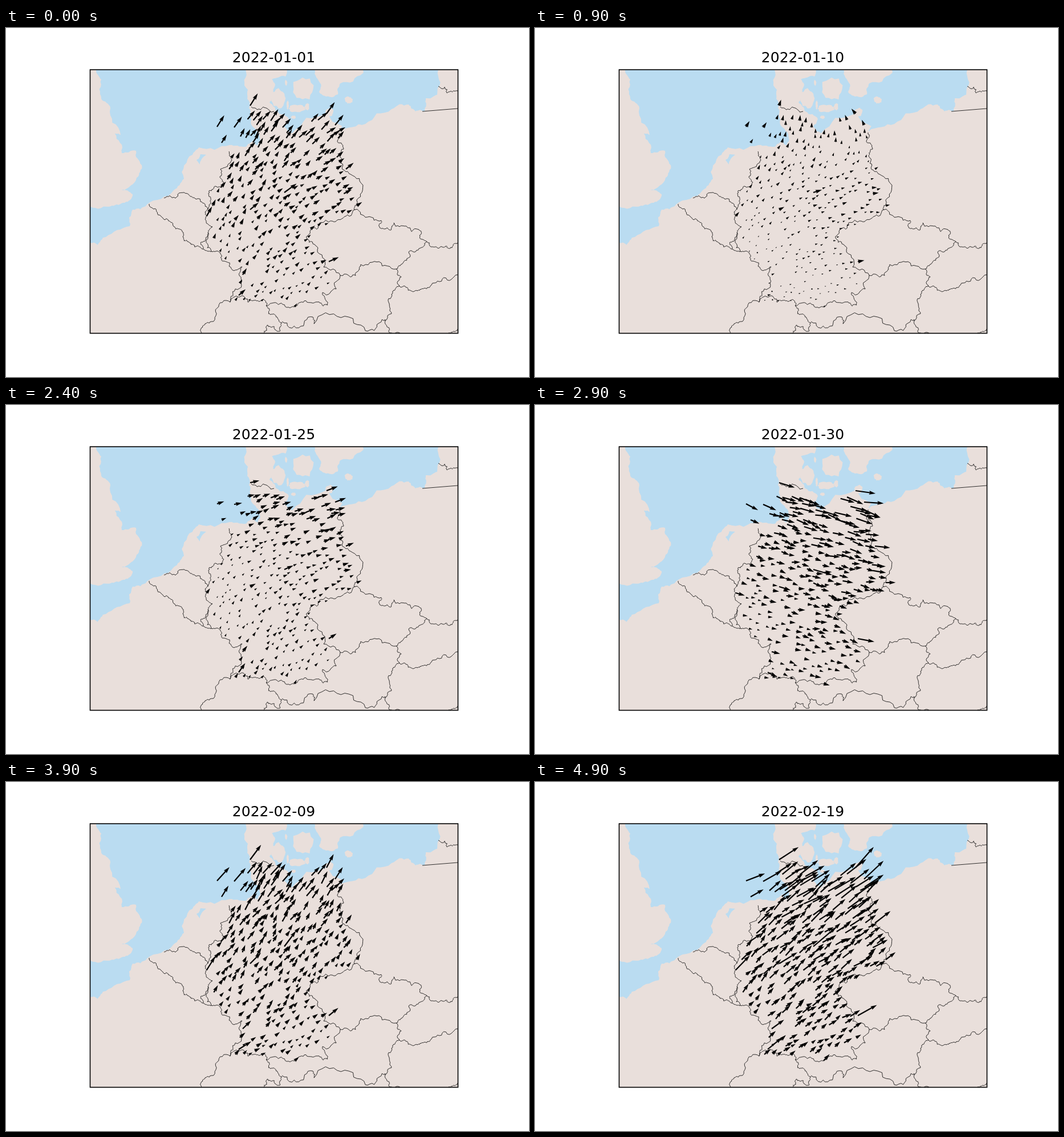
Write an HTML page with a canvas that moves like this. It is 917 px wide and 611 px high and loops after 5 s.

```html
<!DOCTYPE html>
<html lang="en">
<head>
<meta charset="utf-8">
<title>Daily wind</title>
<style>
  html, body { margin: 0; width: 100%; height: 100%; overflow: hidden; background: #fff; }
  canvas { display: block; width: 917px; height: 611px; }
</style>
</head>
<body>
<canvas id="stage" width="917" height="611"></canvas>
<script>
const LAND = '#e9dfdb', SEA = '#badcf1';
const BOX = [147.5, 73, 645, 461.5];
const DAYS = 50, STEP = 100;
const ctx = document.getElementById('stage').getContext('2d');

// Seeded value in 0..1
const hash = (a, b = 0) => {
  const s = Math.sin(a * 12.9898 + b * 78.233 + 4.7) * 43758.5453;
  return s - Math.floor(s);
};
const mix = (a, b, t) => a + (b - a) * t;
const clamp = t => Math.max(0, Math.min(1, t));
const points = text => text.trim().split(/\s+/).map(p => p.split(',').map(Number));

// Roughen a line by displacing the middle of each segment
function rough(list, amount, depth) {
  if (!depth) return list;
  const out = [list[0]];
  for (let i = 1; i < list.length; i++) {
    const [x, y] = list[i - 1], [X, Y] = list[i];
    const d = (hash(x + X, y + Y) - .5) * amount;
    out.push([(x + X) / 2 - (Y - y) * d, (y + Y) / 2 + (X - x) * d], [X, Y]);
  }
  return rough(out, amount, depth - 1);
}

function trace(c, text, amount = 0, depth = 0) {
  c.beginPath();
  rough(points(text), amount, depth).forEach(([x, y]) => c.lineTo(x, y));
}

const seas = [
  // North Sea and Channel
  `158,73 167,90 167,124 183,140 201,187 191,185 203,219 228,215 238,240 229,262 203,284 222,291
   208,306 186,311 147,312 147,376 160,380 175,366 217,347 222,318 247,309 294,284 312,264 327,222
   338,209 392,205 420,208 433,196 441,206 446,196 432,172 426,140 424,108 420,73`,
  // Baltic
  `492,73 490,85 466,90 472,100 462,130 474,146 496,160 488,173 502,184 562,149 590,172 585,181
   630,168 676,142 706,134 718,146 734,146 736,123 756,117 758,73`,
  `334,231 341,221 351,222 340,239`
];
const scania = '541,73 552,98 549,112 570,121 582,116 586,97 626,79 626,73';
// Islands: centre and radii
const isles = points(`478,123,14,16 520,107,19,20 511,141,15,7 528,138,4,6 494,135,2,8
  601,126,7,6 504,156,4,3 567,147,7,7 491,96,2,5`);
const borders = [
  `251,308 272,330 293,346 310,366 319,374 345,387 360,391`,
  `277,298 297,298 332,299 354,318`,
  `391,216 388,243 376,247 382,270 356,285 359,306 349,322 362,348 354,358 360,391 382,408 414,418 397,462 393,480`,
  `354,358 341,376 345,387`,
  `393,480 424,480 455,478 456,486 498,490 536,481 564,485 555,463 586,433`,
  `586,433 546,388 533,356 572,338 612,318`,
  `584,183 592,212 588,228 604,256 615,310 612,318`,
  `612,318 658,337 654,345 674,354 680,341 724,353 738,374 706,392 684,422`,
  `586,433 618,425 622,414 684,422`,
  `738,374 766,384 778,386 792,376`,
  `684,422 690,452 722,460 746,450 792,432`,
  `690,452 676,466 676,500 630,530 540,518 538,506 484,514`,
  `664,510 692,535`,
  `456,486 460,500 484,516 480,531 458,520 450,535`,
  `393,480 360,514 344,535`,
  `430,138 470,146`,
  `758,102 792,110`,
  `774,535 792,527`
];

function drawMap(c) {
  c.fillStyle = LAND;
  c.fillRect(...BOX);
  c.save();
  c.beginPath();
  c.rect(...BOX);
  c.clip();
  c.fillStyle = SEA;
  seas.forEach(s => { trace(c, s, .35, 3); c.fill(); });
  c.fillStyle = LAND;
  trace(c, scania, .3, 3);
  c.fill();
  isles.forEach(([x, y, rx, ry]) => {
    c.beginPath();
    for (let a = 0; a < 20; a++) {
      const r = .8 + .35 * hash(x, a);
      c.lineTo(x + rx * r * Math.cos(a * Math.PI / 10), y + ry * r * Math.sin(a * Math.PI / 10));
    }
    c.fill();
  });
  c.strokeStyle = '#000';
  c.lineWidth = .8;
  borders.forEach(s => { trace(c, s, .6, 4); c.stroke(); });
  trace(c, '730,146 792,141');
  c.stroke();
  c.restore();
}
const map = document.createElement('canvas');
map.width = 917;
map.height = 611;
drawMap(map.getContext('2d'));

// Weather stations: outposts with their exposure, then a seeded fill
const stations = points(`370,173,1 428,136,1 400,174,1 378,201,.8 562,150,1 577,170,1 596,247,1
  615,311,.8 488,288,2 566,409,1.9 408,468,2.2 415,432,1.6 352,329,1.6 428,318,1.6 506,488,1`);
trace(ctx, `428,150 468,150 497,184 540,160 570,164 586,195 598,265 608,322 534,360
  544,395 578,434 548,468 470,480 394,478 408,414 365,400 360,300 384,262 394,205 406,190`);
for (let i = 0; stations.length < 290 && i < 9000; i++) {
  const x = mix(352, 615, hash(i, 1)), y = mix(146, 486, hash(i, 2));
  if (ctx.isPointInPath(x, y) && stations.every(s => Math.hypot(s[0] - x, s[1] - y) > 8.5)) {
    const coast = clamp((230 - y) / 40);
    stations.push([x, y, mix(.5, .75, coast) + mix(.55, .3, coast) * hash(i, 5)]);
  }
}

// Wind on chosen days: west and east vectors at each latitude row
const ROWS = [155, 280, 470];
const winds = [
  [0, 13, -22, 17, -18, 6, -12, 14, -6, 4, -6, 7, -4],
  [9, 6, -11, -7, -10, 4, -6, 10, -2, 2, -1, 5, 0],
  [16, 27, 9, 40, -1, 11, -3, 23, -5, 8, -6, 15, -8],
  [24, 14, -5, 21, -7, 3, -4, 12, -4, 5, -8, 5, -5],
  [29, 24, 10, 36, 9, 11, 3, 23, 3, 7, 2, 13, 4],
  [35, 26, -26, 24, -21, 11, -15, 17, -11, 10, -6, 12, -6],
  [44, 14, -30, 4, -20, 10, -17, -1, -15, 9, -10, 2, -3],
  [49, 33, -18, 38, -33, 17, -18, 24, -16, 11, -9, 14, -9]
];

function windAt(x, y, day) {
  let k = 0;
  while (k < winds.length - 2 && winds[k + 1][0] <= day) k++;
  const a = winds[k], b = winds[k + 1], t = (day - a[0]) / (b[0] - a[0]);
  const r = y > ROWS[1] ? 1 : 0;
  const v = clamp((y - ROWS[r]) / (ROWS[r + 1] - ROWS[r])), h = clamp((x - 370) / 225);
  return [0, 1].map(j => {
    const at = n => mix(a[n + j], b[n + j], t), n = 1 + r * 4;
    return mix(mix(at(n), at(n + 2), h), mix(at(n + 4), at(n + 6), h), v);
  });
}

// Arrow with its tail at x, y; short ones shrink, still ones become dots
const W = 2.25;
function arrow(x, y, u, v) {
  const len = Math.hypot(u, v) / W, full = Math.max(len, 5);
  ctx.save();
  ctx.translate(x, y);
  ctx.rotate(Math.atan2(v, u));
  ctx.beginPath();
  if (len < 1) {
    ctx.arc(0, 0, W / 2, 0, 7);
  } else {
    const s = W * len / full;
    ctx.scale(s, s);
    [[0, -.5], [full - 4.5, -.5], [full - 5, -1.5], [full, 0],
     [full - 5, 1.5], [full - 4.5, .5], [0, .5]].forEach(p => ctx.lineTo(...p));
  }
  ctx.fill();
  ctx.restore();
}

function draw(day) {
  ctx.fillStyle = '#fff';
  ctx.fillRect(0, 0, 917, 611);
  ctx.drawImage(map, 0, 0);
  ctx.fillStyle = '#000';
  stations.forEach(([x, y, k], i) => {
    const [u, v] = windAt(x, y, day);
    const turn = (hash(i, 7) - .5) * .3 + (hash(i, day + 11) - .5) * .25;
    const c = Math.cos(turn) * k, s = Math.sin(turn) * k;
    arrow(x, y, u * c - v * s, u * s + v * c);
  });
  ctx.strokeStyle = '#000';
  ctx.lineWidth = 1.6;
  ctx.strokeRect(...BOX);
  ctx.font = '25px "DejaVu Sans", sans-serif';
  ctx.textAlign = 'center';
  ctx.fillText(new Date(Date.UTC(2022, 0, 1 + day)).toISOString().slice(0, 10), 469.5, 60);
}

const start = performance.now();
let shown = -1;
function tick() {
  const day = Math.floor((performance.now() - start) / STEP) % DAYS;
  if (day !== shown) draw(shown = day);
  requestAnimationFrame(tick);
}
tick();
</script>
</body>
</html>
```
